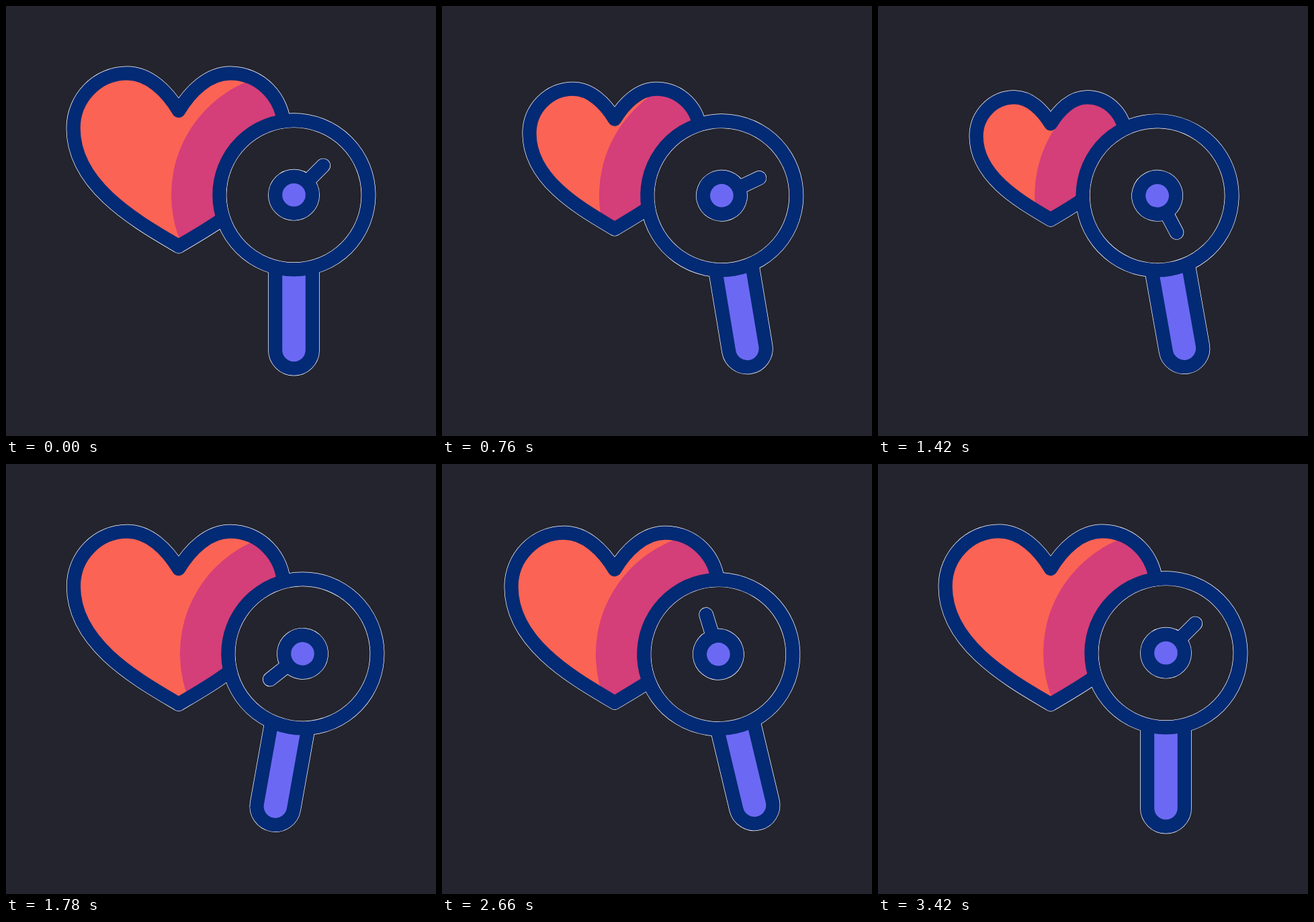
Recreate the animation shown at these times as an HTML page with a canvas. Size 640 by 640 pixels, loop 3600 ms.

```html
<!DOCTYPE html>
<html lang="en">
<head>
<meta charset="utf-8">
<title>Heart and magnifier</title>
<style>
  html, body { margin: 0; height: 100%; overflow: hidden; background: #24242e; }
  canvas { display: block; width: 100vw; height: 100vh; }
</style>
</head>
<body>
<canvas width="640" height="640"></canvas>
<script>
const ctx = document.querySelector('canvas').getContext('2d');
const BG = '#24242e', NAVY = '#032a74', CORAL = '#fb6355', PINK = '#d43e79',
      VIOLET = '#6b69f3', YELLOW = '#ffcb50', WHITE = '#fff';
const LOOP = 3600, LINE = 20.4, RIM = 1.4;
const CX = 428.5, CY = 281.2, PIVOT_Y = 355;

const heart = new Path2D(`M257 156C240 127.5 213 100.4 180.5 100.4
  C136 100.4 100.5 137 100.5 182C100.5 270 200 323.4 257 357.4
  C314 323.4 413.5 270 413.5 182C413.5 137 378 100.4 333.5 100.4
  C301 100.4 274 127.5 257 156Z`);

// Lens parts are centred on the lens
const circle = r => {
  const p = new Path2D();
  p.arc(0, 0, r, 0, 2 * Math.PI);
  return p;
};
const ring = circle(111), hole = circle(101), shade = circle(182.5), hub = circle(27.5);
const handle = new Path2D('M-27.5 107V230.8a27.5 27.5 0 0 0 55 0V107');
const needle = new Path2D('M0 -27.5V-61.7');

// Each spark runs outwards: x, y, dx, dy
const sparks = [
  [408.6, 92.5, 14.1, -40.5], [430.4, 124.8, 42.7, 2.8],
  [144, 319.2, -41.6, 13.5], [175.8, 341.4, 3.4, 42.7]
];

const ease = (t, from, to) => {
  const v = Math.min(1, Math.max(0, (t - from) / (to - from)));
  return v * v * (3 - 2 * v);
};

function stroke(path, color = NAVY, width = LINE) {
  ctx.strokeStyle = color;
  ctx.lineWidth = width;
  ctx.stroke(path);
}

function fill(path, color) {
  ctx.fillStyle = color;
  ctx.fill(path);
}

const rim = path => stroke(path, WHITE, LINE + RIM);

function inLens(tilt, draw) {
  ctx.save();
  ctx.translate(CX, PIVOT_Y);
  ctx.rotate(-tilt * Math.PI / 180);
  ctx.translate(0, CY - PIVOT_Y);
  draw();
  ctx.restore();
}

function heartAt(t) {
  const beat = t < 200 || t > 3400 ? 0 : (t - 200) % 800;
  const s = 1 - 0.296 * (ease(beat, 0, 400) - ease(beat, 400, 800));
  const path = new Path2D();
  path.addPath(heart, new DOMMatrix([s, 0, 0, s, 257 * (1 - s), 222 * (1 - s)]));
  return path;
}

function drawSparks(t) {
  const a = ease(t, 3000, 3400), b = ease(t, 2800, 3100);
  if (b <= a) return;
  for (const [x, y, dx, dy] of sparks) {
    const p = new Path2D();
    p.moveTo(x + dx * a, y + dy * a);
    p.lineTo(x + dx * b, y + dy * b);
    rim(p);
    stroke(p, YELLOW);
  }
}

function draw(t) {
  const tilt = 16 * (ease(t, 200, 1200) - 2 * ease(t, 1200, 2000)
    + 2 * ease(t, 2000, 2800) - ease(t, 2800, 3400));
  const turn = Math.PI / 4 + 2 * Math.PI * ease(t, 200, 3400);
  const body = heartAt(t);

  ctx.fillStyle = BG;
  ctx.fillRect(0, 0, 640, 640);
  ctx.lineJoin = 'round';
  ctx.lineCap = 'round';
  drawSparks(t);

  // Pale rims lie below everything, so they show only against the background
  rim(body);
  inLens(tilt, () => {
    ctx.lineCap = 'butt';
    rim(handle);
    rim(ring);
  });

  fill(body, CORAL);
  ctx.save();
  ctx.clip(body);
  inLens(tilt, () => fill(shade, PINK));
  ctx.restore();
  stroke(body);

  inLens(tilt, () => {
    ctx.lineCap = 'butt';
    fill(handle, VIOLET);
    stroke(handle);
    // The rim inside the lens stays clear of the heart outside it
    fill(hole, WHITE);
    fill(circle(111 - (LINE + RIM) / 2), BG);
    stroke(ring);

    ctx.lineCap = 'round';
    ctx.rotate(turn);
    rim(needle);
    rim(hub);
    stroke(needle);
    fill(hub, VIOLET);
    stroke(hub);
  });
}

const start = performance.now();
function frame() {
  draw((performance.now() - start) % LOOP);
  requestAnimationFrame(frame);
}
frame();
</script>
</body>
</html>
```
